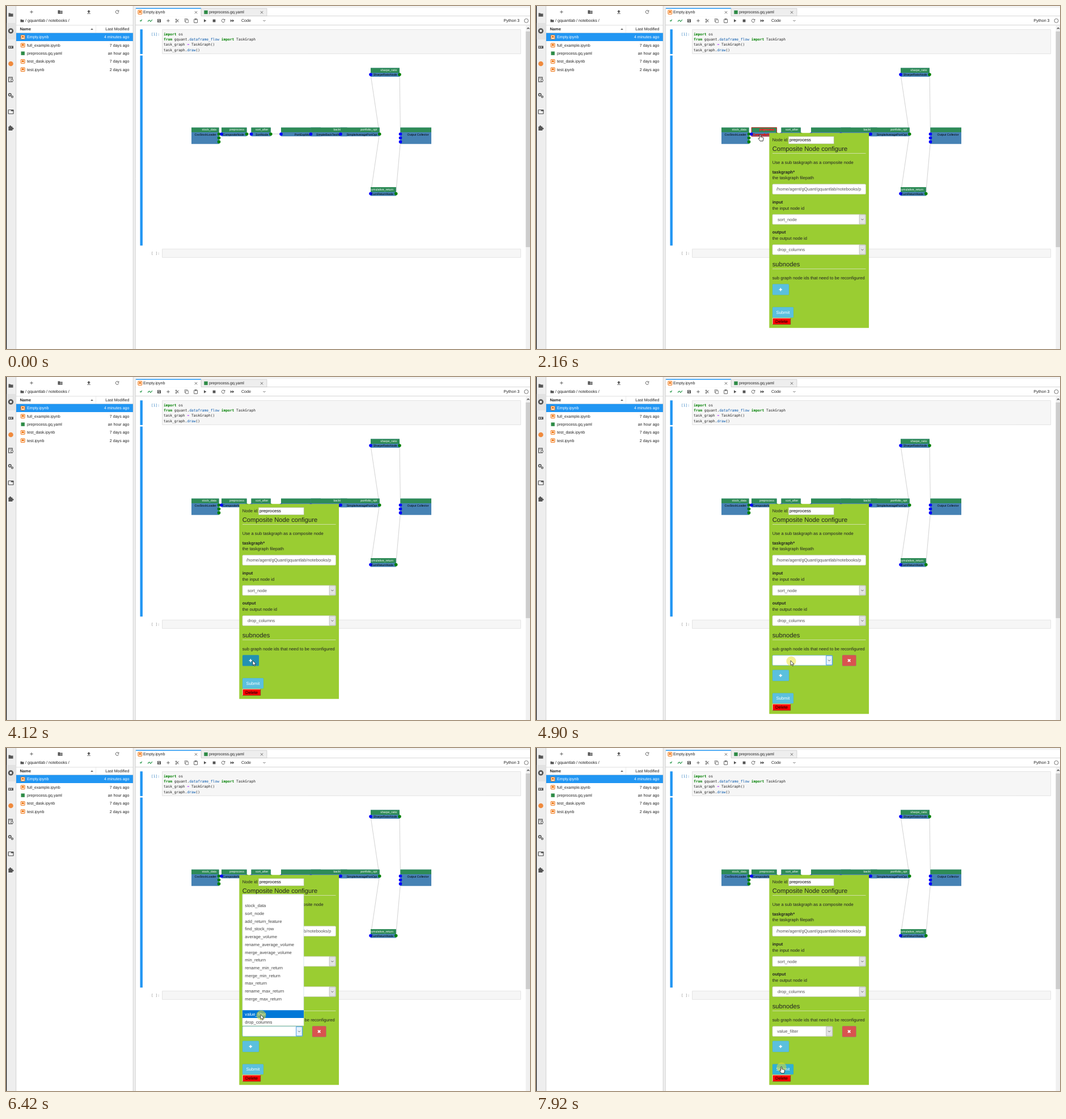
Recreate the animation shown at these times as an HTML page with a canvas. Size 924 by 606 pixels, loop 8 s.

```html
<!DOCTYPE html>
<html lang="en">
<head>
<meta charset="utf-8">
<title>Task graph editor</title>
<style>
html, body { margin: 0; width: 100%; height: 100%; overflow: hidden; background: #fff; }
canvas { display: block; width: 924px; height: 606px; }
</style>
</head>
<body>
<canvas id="stage"></canvas>
<script>
const W = 924, H = 606, LOOP = 8000;
const canvas = document.getElementById('stage');
const ctx = canvas.getContext('2d');
const dpr = window.devicePixelRatio || 1;
canvas.width = W * dpr;
canvas.height = H * dpr;
ctx.scale(dpr, dpr);
ctx.textRendering = 'geometricPrecision';

const SANS = '"Liberation Sans", Arial, sans-serif';
const MONO = '"DejaVu Sans Mono", monospace';
const BLUE = '#2196f3', ICON = '#555', GREEN = '#2e8b57', STEEL = '#4682b4';
const INFO = '#5bc0de', INFO_HOVER = '#31b0d5', INFO_ACTIVE = '#2391b1';

// ---------- helpers ----------
function box(x, y, w, h, fill, stroke, radius = 0, line = 0.7) {
  ctx.beginPath();
  ctx.roundRect(x, y, w, h, radius);
  if (fill) { ctx.fillStyle = fill; ctx.fill(); }
  if (stroke) { ctx.strokeStyle = stroke; ctx.lineWidth = line; ctx.stroke(); }
}

function dot(x, y, r, fill, stroke, line = 0.8) {
  ctx.beginPath();
  ctx.arc(x, y, r, 0, Math.PI * 2);
  if (fill) { ctx.fillStyle = fill; ctx.fill(); }
  if (stroke) { ctx.strokeStyle = stroke; ctx.lineWidth = line; ctx.stroke(); }
}

function line(x1, y1, x2, y2, color, width = 0.7) {
  ctx.beginPath();
  ctx.moveTo(x1, y1);
  ctx.lineTo(x2, y2);
  ctx.strokeStyle = color;
  ctx.lineWidth = width;
  ctx.stroke();
}

// y is the optical middle of the text
function text(s, x, y, size, color, { align = 'left', weight = '', font = SANS, outline } = {}) {
  ctx.font = `${weight} ${size}px ${font}`;
  ctx.textAlign = align;
  ctx.fillStyle = color;
  ctx.fillText(s, x, y + size * 0.35);
  if (outline) {
    ctx.strokeStyle = outline;
    ctx.lineWidth = 0.6;
    ctx.strokeText(s, x, y + size * 0.35);
  }
}

function shape(d, x, y, fill, stroke, width = 0.9) {
  const path = new Path2D(d);
  ctx.save();
  ctx.translate(x, y);
  if (fill) { ctx.fillStyle = fill; ctx.fill(path); }
  if (stroke) { ctx.strokeStyle = stroke; ctx.lineWidth = width; ctx.lineJoin = 'round'; ctx.stroke(path); }
  ctx.restore();
}

const within = (p, x, y, w, h) => p.x >= x && p.x <= x + w && p.y >= y && p.y <= y + h;

const PLUS = 'M-2.7 0H2.7M0 -2.7V2.7';
const FOLDER = 'M-4 -3H-1L0 -2H4V3.2H-4Z';
const CHEVRON = 'M-2 -1L0 1L2 -1';
const CROSS = 'M-2.2 -2.2L2.2 2.2M2.2 -2.2L-2.2 2.2';
const REFRESH = 'M2.3 -1.7A2.8 2.8 0 1 0 2.8 .6M2.9 -3V-.9H.8';

// ---------- static interface ----------
function notebookIcon(x, y) {
  box(x - 3.4, y - 3.4, 6.8, 6.8, '#fff', '#ef6c00', 0.5, 1);
  shape('M-1.8 -2H1.8V2L0 .6L-1.8 2Z', x, y, '#ef6c00');
}

const greenSquare = (x, y) => box(x - 3.2, y - 3.2, 6.4, 6.4, '#2e8b46');

function sideBar() {
  box(0, 0, 18, H, '#eeeeee');
  box(0, 0, 1.2, H, '#111');
  line(17.7, 0, 17.7, H, '#c4c4c4');
  box(1.2, 30, 16.3, 29, '#e2e2e2');
  shape(FOLDER, 8.5, 15.5, ICON);
  dot(8.5, 44, 4.7, ICON);
  box(6.7, 42.2, 3.6, 3.6, '#eee');
  box(4, 70.5, 9, 4.6, ICON);
  box(5.2, 71.7, 1.8, 2, '#eee');
  box(8.4, 71.7, 1.8, 2, '#eee');
  dot(8.5, 102, 4.3, '#ef8a3c');
  box(4.6, 125.8, 6.6, 8, null, ICON, 0, 1.2);
  line(6, 128, 10, 128, ICON);
  dot(10.6, 131.4, 2, '#eee', ICON, 1);
  dot(6.8, 156.8, 2.2, null, ICON, 1.6);
  dot(11, 160.4, 1.5, null, ICON, 1.3);
  box(4.2, 183.5, 8.8, 7, null, ICON, 0.5, 1.2);
  box(8.8, 183.3, 4.4, 2.5, ICON);
  box(4.4, 213, 7, 7, ICON);
  dot(7.6, 212.5, 1.6, ICON);
  dot(12, 216.5, 1.6, ICON);
}

const FILES = [
  ['Empty.ipynb', '4 minutes ago'],
  ['full_example.ipynb', '7 days ago'],
  ['preprocess.gq.yaml', 'an hour ago'],
  ['test_dask.ipynb', '7 days ago'],
  ['test.ipynb', '2 days ago']
];

function fileBrowser() {
  const size = 7.1, ink = '#212121';
  shape(PLUS, 45, 10.5, null, ICON);
  shape(FOLDER, 95.5, 10.5, ICON);
  shape(PLUS, 96.8, 11, null, '#fff', 0.5);
  shape('M0 -3.2L3 0H1.2V2H-1.2V0H-3ZM-3 2.6H3V3.5H-3Z', 146, 10.3, ICON);
  shape(REFRESH, 196, 10.5, null, ICON);
  ctx.save();
  ctx.translate(28.5, 26);
  ctx.scale(0.75, 0.75);
  shape(FOLDER, 0, 0, ICON);
  ctx.restore();
  text('/ gquantlab / notebooks /', 34, 26, size, ink);
  line(18, 34, 224, 34, '#d0d0d0');
  line(18, 47.5, 224, 47.5, '#d0d0d0');
  line(158.5, 34, 158.5, 47.5, '#e4e4e4');
  text('Name', 24.5, 41, size, ink, { weight: 'bold' });
  shape('M-2.3 1.2L0 -1.3L2.3 1.2Z', 151.5, 40.8, ICON);
  text('Last Modified', 217.5, 41, size, ink, { align: 'right' });
  box(18, 47.8, 206, 14.3, BLUE);
  FILES.forEach(([name, age], i) => {
    const y = 55 + i * 14.3, color = i ? ink : '#fff';
    (name.endsWith('yaml') ? greenSquare : notebookIcon)(29.7, y);
    text(name, 37, y, size, color);
    text(age, 217.5, y, size, color, { align: 'right' });
  });
  box(224, 0, 4.2, H, '#f0f0f0');
  line(224.2, 0, 224.2, H, '#c4c4c4');
  line(228.2, 3, 228.2, H, '#c4c4c4');
}

function tabsAndToolbar() {
  box(228, 0, W - 228, 3.6, '#f4f4f4');
  line(228, 17.6, W, 17.6, '#c8c8c8');
  box(344, 4.3, 116, 13.3, '#eeeeee', '#c8c8c8');
  box(229, 4, 115, 14.2, '#fff');
  box(229, 3.6, 115, 1.4, BLUE);
  line(344, 4, 344, 17.6, '#c8c8c8');
  notebookIcon(236.3, 11);
  greenSquare(352.5, 11);
  text('Empty.ipynb', 242, 11, 7.1, '#212121');
  text('preprocess.gq.yaml', 358, 11, 7.1, '#212121');
  shape(CROSS, 335, 11.3, null, ICON, 0.8);
  shape(CROSS, 451, 11.3, null, ICON, 0.8);

  const y = 26;
  shape('M2.5 -2.5L-3 .2L-.6 .6L-.4 2.6Z', 238, y, '#2e9a50');
  shape('M-4 1.5L-1.5 -1.2L1 1.3L4 -1.8', 254, y, null, '#2e9a50', 1.2);
  shape('M-3 -3H2L3 -2V3H-3Z', 270, y, ICON);
  box(268.4, y - 2.2, 2.6, 1.4, '#fff');
  dot(270, y + 1.2, 1, '#fff');
  shape(PLUS, 286, y, null, ICON);
  shape('M-2.5 -3L2.6 2.4M-2.5 3L2.6 -2.4', 302, y, null, ICON, 1);
  dot(300, y - 2, 1.1, '#fff', ICON);
  dot(300, y + 2, 1.1, '#fff', ICON);
  box(315.2, y - 3.4, 4.6, 5, null, ICON);
  box(316.8, y - 1.8, 4.6, 5.2, '#fff', ICON);
  box(331.6, y - 2.8, 6, 6.4, null, ICON, 0.4, 0.9);
  box(333, y - 3.6, 3.2, 2, ICON);
  shape('M-2 -2.7L2.4 0L-2 2.7Z', 351, y, ICON);
  box(364.6, y - 2.3, 4.8, 4.8, ICON);
  shape(REFRESH, 383, y, null, ICON);
  shape('M-3.2 -2.5L0 0L-3.2 2.5ZM0 -2.5L3.4 0L0 2.5Z', 399, y, ICON);
  text('Code', 415, y, 7.1, '#212121');
  shape(CHEVRON, 455.5, y, null, ICON);
  text('Python 3', 905.5, y, 7.1, '#212121', { align: 'right' });
  dot(917.5, y, 3.5, '#fff', ICON);
  line(228, 33.7, W, 33.7, '#cfcfcf', 0.9);
}

const CODE = [
  [['import', 'k'], [' os']],
  [['from', 'k'], [' gquant.'], ['dataframe_flow', 'p'], [' '], ['import', 'k'], [' TaskGraph']],
  [['task_graph '], ['=', 'o'], [' TaskGraph()']],
  [['task_graph.'], ['draw', 'p'], ['()']]
];
const CODE_COLORS = { k: '#008000', p: '#0055aa', o: '#aa22ff' };

function notebook() {
  const size = 6.26, step = size * 0.602;
  box(236.5, 41.3, 4.4, 43.6, BLUE);
  box(236.5, 87.5, 4.4, 335.8, BLUE);
  box(275.6, 41.6, 632, 42.8, '#f6f6f6', '#dcdcdc');
  box(275.6, 429.3, 632, 15, '#f6f6f6', '#dcdcdc');
  text('[1]:', 271, 49.6, size, '#307fc1', { align: 'right', font: MONO });
  text('[ ]:', 271, 436.8, size, '#8a8a8a', { align: 'right', font: MONO });
  CODE.forEach((parts, row) => {
    let x = 278;
    for (const [s, kind] of parts) {
      text(s, x, 49.6 + row * 9.25, size, CODE_COLORS[kind] || '#212121',
        { font: MONO, weight: kind === 'k' ? 'bold' : '' });
      x += s.length * step;
    }
  });
  box(916.6, 34, 7.4, H - 34, '#f0f0f0');
  box(916.6, 45, 7.4, 381, '#cdcdcd');
  shape('M-2 1L0 -1L2 1', 920.8, 39.5, null, '#444', 1.1);
}

// ---------- task graph ----------
const NODES = [
  { x: 327, y: 214.7, w: 48.5, h: 29, id: 'stock_data', type: 'CsvStockLoader', out: 3 },
  { x: 380, y: 214.7, w: 44.5, h: 15.6, id: 'preprocess', type: 'CompositeNode', in: 1, out: 1 },
  { x: 432.5, y: 214.7, w: 34.3, h: 15.6, id: 'sort_after', type: 'SortNode', in: 1, out: 1 },
  { x: 485, y: 214.7, w: 70, h: 15.6, id: '', type: 'PortExpMovingAv', in: 1 },
  { x: 537.5, y: 214.7, w: 64, h: 15.6, id: 'backtest', type: 'SimpleBackTestNode', in: 1 },
  { x: 590, y: 214.7, w: 68.7, h: 15.6, id: 'portfolio_opt', type: 'SimpleAveragePortOpt', in: 1, out: 1 },
  { x: 643, y: 109.5, w: 51, h: 15.6, id: 'sharpe_ratio', type: 'SharpeRatioNode', in: 1, out: 1 },
  { x: 643, y: 320, w: 44.7, h: 15.6, id: 'cumulative_return', type: 'CumReturnNode', in: 1, out: 1 },
  { x: 695.5, y: 214.7, w: 54.5, h: 29, id: '', type: 'Output Collector', in: 3 }
];
const EDGES = [
  [375, 226, 380, 226], [424, 226, 432, 226], [467, 226, 485, 226],
  [658.5, 226, 643, 121], [658.5, 226, 643, 331.5],
  [694, 121, 695.5, 226], [687.5, 331.5, 695.5, 240]
];

function node(n, hot) {
  const outline = hot ? '#e0201c' : null, right = n.x + n.w - 4.5;
  box(n.x, n.y, n.w, n.h, STEEL);
  box(n.x, n.y, n.w, 8.4, GREEN);
  if (hot) box(n.x, n.y, n.w, n.h, null, outline, 0, 0.9);
  for (let i = 0; i < (n.in || 0); i++) dot(n.x, n.y + 11.6 + i * 6.8, 2.8, '#0000ff');
  for (let i = 0; i < (n.out || 0); i++) dot(n.x + n.w, n.y + 11.6 + i * 6.8, 2.8, '#008000');
  ctx.save();
  ctx.beginPath();
  ctx.rect(n.x, n.y, n.w, n.h);
  ctx.clip();
  text(n.id, right, n.y + 3.8, 5.25, '#fff', { align: 'right', outline });
  text(n.type, right, n.y + 12, 5.25, '#000', { align: 'right', outline });
  ctx.restore();
}

function graph(p) {
  for (const e of EDGES) line(...e, '#b4b4b4', 0.6);
  let hovering = false;
  NODES.forEach((n, i) => {
    const hot = i < 2 && within(p, n.x, n.y, n.w, n.h);
    hovering = hovering || hot;
    node(n, hot);
  });
  return hovering;
}

// ---------- configuration panel ----------
const OPEN = 2160, GROW = 4200, LIST = [4980, 6500], BLUR = 7840;
const ROW = 13.67, LIST_TOP = 258.3;
const OPTIONS = ['', 'stock_data', 'sort_node', 'add_return_feature', 'find_stock_row',
  'average_volume', 'rename_average_volume', 'merge_average_volume', 'min_return',
  'rename_min_return', 'merge_min_return', 'max_return', 'rename_max_return',
  'merge_max_return', '', 'value_filter', 'drop_columns'];
const BODY = 7.66, INK = '#222';

function select(x, y, w, value, focus, inset = 9) {
  box(x, y, w, 17.6, '#fff', focus ? '#66afe9' : '#ccc', 1.5);
  box(x + w - 11.3, y + 0.6, 10.7, 16.4, focus ? '#e5f1fb' : '#e3e3e3', focus ? '#0078d7' : '#adadad');
  shape(CHEVRON, x + w - 6, y + 8.9, null, '#444', 0.8);
  text(value, x + inset, y + 8.8, BODY, focus ? '#333' : '#555');
}

function heading(s, y) {
  text(s, 416.7, y, 11.2, INK);
  line(417, y + 8.2, 581.5, y + 8.2, '#dfe8c8', 0.8);
}

function label(title, note, y) {
  text(title, 416.7, y, BODY, INK, { weight: 'bold' });
  text(note, 416.7, y + 10.7, BODY, INK);
}

function button(x, y, w, h, fill) {
  box(x, y, w, h, fill, 'rgba(40,150,190,.35)', 1.5, 0.5);
}

function panel(t, p) {
  const grown = t >= GROW, dy = grown ? 26.4 : 0;
  const overPlus = within(p, 417, 491 + dy, 29, 19.6);
  const overSubmit = within(p, 417, 532 + dy, 37, 18.4);

  box(411.3, 224.2, 175.7, 344.6 + dy, '#9acd32');
  text('Node id:', 416.7, 236.8, BODY, INK);
  box(445.3, 230.5, 80, 13, '#fff', '#a9b98c');
  text('preprocess', 447, 236.8, BODY, '#000');
  heading('Composite Node configure', 252.2);
  text('Use a sub taskgraph as a composite node', 416.7, 276.6, BODY, INK);
  label('taskgraph*', 'the taskgraph filepath', 293);
  box(417, 314.8, 164.5, 17.6, '#fff', '#ccc', 1.5);
  text('/home/agent/gQuant/gquantlab/notebooks/p', 423.8, 323.6, BODY, '#555');
  label('input', 'the input node id', 346.3);
  select(417, 368.2, 164.5, 'sort_node');
  label('output', 'the output node id', 399.8);
  select(417, 421.7, 164.5, 'drop_columns');
  heading('subnodes', 456.2);
  text('sub graph node ids that need to be reconfigured', 416.7, 480.7, BODY, INK);

  if (grown) {
    const focus = t >= 4900 && t < BLUR;
    select(417, 491.8, 106, t >= LIST[1] ? 'value_filter' : '', focus, 8.2);
    button(540, 491.2, 24.5, 19.4, '#d9534f');
    shape(CROSS, 552.2, 500.9, null, '#fff', 1.7);
  }

  let plus = INFO;
  if (t >= 3960 && t < GROW) plus = INFO_ACTIVE;
  else if (t < 4900 && (grown || overPlus)) plus = INFO_HOVER;
  button(417, 491.2 + dy, 29, 19.4, plus);
  shape(PLUS, 431.3, 501 + dy, null, '#fff', 1.6);
  button(417, 532 + dy, 37, 18.4, overSubmit ? INFO_HOVER : INFO);
  text('Submit', 435.4, 541.2 + dy, BODY, '#fff', { align: 'center' });
  box(417, 551.4 + dy, 32, 11.4, '#ff0000');
  line(417, 551.5 + dy, 449, 551.5 + dy, '#f3e6e0', 0.8);
  line(417.3, 551.4 + dy, 417.3, 562.8 + dy, '#f3e6e0', 0.8);
  line(417, 562.5 + dy, 449, 562.5 + dy, '#7a4a30', 0.7);
  line(448.8, 551.4 + dy, 448.8, 562.8 + dy, '#7a4a30', 0.7);
  text('Delete', 433, 557.1 + dy, BODY, '#000', { align: 'center' });

  if (t >= LIST[0] && t < LIST[1]) optionList(p);
  return overSubmit || (overPlus && !(t >= 4100 && t < GROW));
}

function optionList(p) {
  const over = Math.floor((p.y - LIST_TOP) / ROW);
  const active = over < OPTIONS.length ? over : 0;
  box(417, LIST_TOP, 108, ROW * OPTIONS.length, '#fff', '#c8d8e8');
  box(417, LIST_TOP + active * ROW, 108, ROW, '#0078d7');
  OPTIONS.forEach((s, i) =>
    text(s, 421.3, LIST_TOP + (i + 0.5) * ROW, BODY, i === active ? '#fff' : '#444'));
}

// ---------- pointer ----------
const PATH = [
  [440, 786, 546], [1220, 368, 240], [1260, 368, 240], [1620, 394.5, 227],
  [2520, 394.5, 227], [2960, 459, 370], [3340, 440, 458], [3800, 435, 501],
  [4360, 435, 501], [4660, 449, 501], [5500, 449, 501], [5800, 448, 463],
  [6100, 448, 463], [6200, 449, 471], [6920, 449, 471], [7200, 443, 530], [7760, 432, 563]
];
const CLICKS = [[2000, 2160], [3960, 4100], [4900, 5040], [6420, 6560], [7840, 8000]];

function pointerAt(t) {
  const i = PATH.findIndex(k => k[0] > t);
  if (i === 0) return { x: -99, y: -99 };
  if (i < 0) { const [, x, y] = PATH[PATH.length - 1]; return { x, y }; }
  const [t0, x0, y0] = PATH[i - 1], [t1, x1, y1] = PATH[i];
  const u = (t - t0) / (t1 - t0), e = u * u * (3 - 2 * u);
  return { x: x0 + (x1 - x0) * e, y: y0 + (y1 - y0) * e };
}

function pointer(t, p, hand) {
  if (CLICKS.some(([a, b]) => t >= a && t < b)) dot(p.x + 1, p.y + 1, 8.6, 'rgba(235,225,40,.5)');
  if (hand) {
    shape('M-.3 .6Q.8 -.6 1.7 .6V4.3L5.6 5.2Q6.8 5.6 6.6 7L5.7 11.6H.6L-2.4 7.4Q-2.4 6 -1.2 6.4L-.3 7.2Z',
      p.x, p.y, '#fff', '#111', 0.8);
  } else {
    shape('M0 0V8.4L1.9 6.7L3.2 9.6L4.6 9L3.3 6.2H6Z', p.x, p.y, '#fff', '#111', 0.7);
  }
}

// ---------- frame ----------
function draw(t) {
  const p = pointerAt(t);
  box(0, 0, W, H, '#fff');
  sideBar();
  fileBrowser();
  tabsAndToolbar();
  notebook();
  let hand = graph(p);
  if (t >= OPEN) hand = panel(t, p) || hand;
  pointer(t, p, hand);
}

const start = performance.now();
function tick() {
  draw((performance.now() - start) % LOOP);
  requestAnimationFrame(tick);
}
tick();
</script>
</body>
</html>
```
